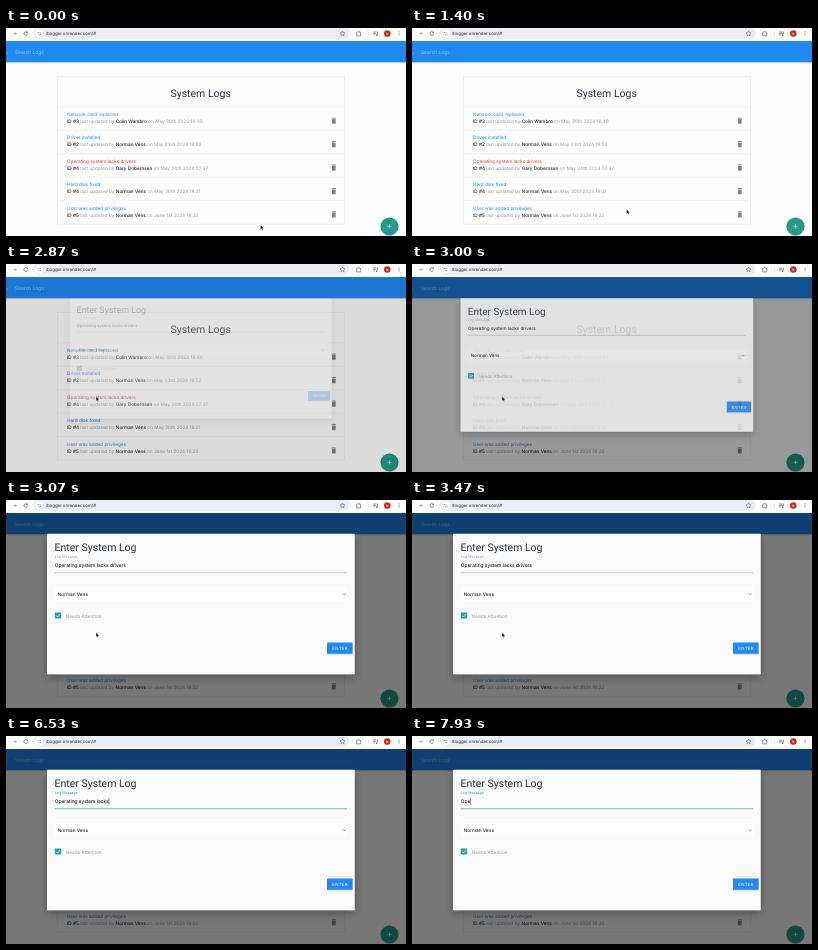
Recreate the animation shown at these times as an HTML page. Size 400 by 208 pixels, loop 8000 ms.

```html
<!DOCTYPE html>
<html lang="en">
<head>
<meta charset="utf-8">
<title>System Logs</title>
<style>
html, body { margin: 0; width: 100%; height: 100%; overflow: hidden; background: #fdfdfd; }
svg { display: block; width: 100vw; height: 100vh; }
text { font: 4.72px Inter, Roboto, sans-serif; white-space: pre; text-rendering: geometricPrecision; }
.head { font: 10.5px Roboto, Inter, sans-serif; fill: #26303f; }
.link { fill: #2089f2; }
.alert { fill: #e0382e; }
.dim { fill: #9e9e9e; }
.icon { fill: none; stroke: #66696e; stroke-width: .7; }
</style>
</head>
<body>
<svg viewBox="0 0 400 208">
  <defs>
    <filter id="shade" x="-20%" y="-20%" width="140%" height="150%">
      <feDropShadow dx="0" dy="3" stdDeviation="4" flood-opacity=".32"/>
    </filter>
    <filter id="soft" x="-30%" y="-30%" width="160%" height="170%">
      <feDropShadow dx="0" dy=".6" stdDeviation=".6" flood-opacity=".22"/>
    </filter>
  </defs>

  <!-- page -->
  <rect width="400" height="208" fill="#fdfdfd"/>
  <rect y="10" width="400" height="24.2" fill="#2089f2" filter="url(#soft)"/>
  <path d="M0 24.6l.9 1" stroke="#fff" stroke-width=".7"/>
  <text x="9" y="25.6" style="font-size:4.86px" fill="#a0cdf9">Search Logs</text>
  <rect x="51.3" y="48.4" width="287.2" height="147.7" fill="#fdfdfd" stroke="#e6e6e6" stroke-width=".5"/>
  <text class="head" x="194.7" y="69.4" text-anchor="middle">System Logs</text>
  <g id="rows"></g>
  <circle cx="383.5" cy="198.4" r="9" fill="#219b8b" filter="url(#soft)"/>
  <path d="M381.5 198.4h4M383.5 196.4v4" stroke="#fff" stroke-width=".7"/>
  <rect id="veil" y="13" width="400" height="195"/>

  <!-- browser bar -->
  <rect width="400" height="13" fill="#fcfcfd"/>
  <rect x="27.5" y="-1" width="316" height="12" rx="6" fill="#e9eef6"/>
  <circle cx="33.3" cy="5.5" r="3.9" fill="#fff"/>
  <g class="icon">
    <path d="M7 5.5h3.2M8.8 4l1.5 1.5L8.8 7" stroke="#a0a3a7"/>
    <path d="M21.3 4.6a1.8 1.8 0 1 0 .2 1.5M21.6 3.5v1.3h-1.3"/>
    <path d="M31.7 4.5h1.6M34.4 4.5h.6M31.7 6.6h.6M33.4 6.6h1.6"/>
    <path d="M336.5 3.1l.7 1.6 1.8.2-1.3 1.2.4 1.8-1.6-.9-1.6.9.4-1.8-1.3-1.2 1.8-.2z" stroke-width=".6"/>
    <path d="M350.7 4.2h1.2a.7.7 0 0 1 1.4 0h1.2v1.2a.7.7 0 0 1 0 1.4v1.1h-3.8z"/>
    <path d="M362.5 3.5v4" stroke="#cdd9ec" stroke-width=".5"/>
    <path d="M367.2 4h3M367.2 5.4h3M367.2 6.8h1.6M371.2 7.2V4h1"/>
  </g>
  <circle cx="370.6" cy="7.2" r=".8" fill="#66696e"/>
  <circle cx="381.3" cy="5.5" r="3.3" fill="#c5301c"/>
  <text x="381.3" y="6.7" text-anchor="middle" style="font-size:3.2px" fill="#fff">N</text>
  <path d="M393 3.9v3.4" stroke="#66696e" stroke-width=".9" stroke-linecap="round" stroke-dasharray="0 1.6"/>
  <text x="40" y="7.1" style="font-size:4.4px" fill="#222">itlogger.onrender.com/#</text>

  <!-- dialog -->
  <g id="modal">
    <rect x="41" y="33.7" width="307.7" height="140.6" rx=".6" fill="#fafafa" filter="url(#shade)"/>
    <text class="head" x="48.6" y="51.1">Enter System Log</text>
    <text id="label" x="48.8" y="57.9" style="font-size:3.6px">Log Message</text>
    <text id="field" x="48.8" y="67.3" style="font-size:4.86px"></text>
    <path id="line" d="M48.7 72.8H341"/>
    <path id="caret" d="M0 62.2v6.4" stroke="#222" stroke-width=".5"/>
    <rect x="48.7" y="87" width="292.3" height="13.6" fill="#fff"/>
    <text x="51.8" y="95.7">Norman Vens</text>
    <path d="M337 93.5l1.3 1.3 1.3-1.3" fill="none" stroke="#333" stroke-width=".6"/>
    <rect x="48.8" y="112.4" width="6.4" height="6.2" rx=".6" fill="#26a69a"/>
    <path d="M50.3 115.6l1.3 1.4 2.4-2.9" fill="none" stroke="#fff" stroke-width=".7"/>
    <text class="dim" x="59.8" y="117.9">Needs Attention</text>
    <rect x="321" y="142.4" width="25.6" height="11.4" rx=".6" fill="#2089f2" filter="url(#soft)"/>
    <text x="334" y="149.8" text-anchor="middle" style="font-size:4.3px;letter-spacing:.3px" fill="#fff">ENTER</text>
  </g>

  <path id="arrow" d="M0 0V4.6L1.1 3.6 1.8 5.2 2.6 4.9 1.9 3.3H3.3Z" fill="#111" stroke="#fff" stroke-width=".3"/>
  <path id="beam" d="M-1-2.3Q0-2.3 0-1.7V1.7Q0 2.3-1 2.3M1-2.3Q0-2.3 0-1.7V1.7Q0 2.3 1 2.3" fill="none" stroke="#333" stroke-width=".35"/>
</svg>
<script>
const $ = id => document.getElementById(id);
const MESSAGE = 'Operating system lacks drivers';
const LOOP = 8000, OPEN = 2805, FOCUS = 4530;

const logs = [
  ['Network card replaced', 3, 'Colin Wambro', 'May 30th 2024 16:49'],
  ['Driver installed', 2, 'Norman Vens', 'May 23rd 2024 18:52'],
  [MESSAGE, 4, 'Gary Dobernsen', 'May 24th 2024 07:37'],
  ['Hard disk fixed', 4, 'Norman Vens', 'May 30th 2024 18:21'],
  ['User was added privileges', 5, 'Norman Vens', 'June 1st 2024 16:22']
];
$('rows').innerHTML = logs.map(([title, id, who, when], i) => `
  <g transform="translate(0 ${78.8 + i * 23.45})">
    <path d="M51.3 0H338.5" stroke="#e6e6e6" stroke-width=".5"/>
    <text class="${title === MESSAGE ? 'alert' : 'link'}" x="61" y="9">${title}</text>
    <text x="61" y="16.2">ID #${id} <tspan class="dim">last updated by</tspan> ${who} <tspan class="dim">on ${when}</tspan></text>
    <path d="M325.6 11.8h4.4v-.8h-1.2l-.4-.4h-1.2l-.4.4h-1.2zM325.9 12.3h3.8v4.1q0 .6-.6.6h-2.6q-.6 0-.6-.6z" fill="#858585"/>
  </g>`).join('');

// Moments at which a character is deleted: one tap, then runs of key repeat
const run = (from, to, n) => Array.from({ length: n }, (_, i) => from + (to - from) * i / (n - 1));
const edits = [5170, ...run(5930, 6270, 6), ...run(6470, 7270, 12), ...run(7400, 7925, 8)];

// Pointer moves: start, end, from, to
const moves = [
  [1000, 2250, [254.5, 197], [90, 132.5]],
  [3700, 4450, [90, 132.5], [129.3, 66.5]]
];

const clamp = x => Math.min(1, Math.max(0, x));
const smooth = x => x * x * (3 - 2 * x);
const show = (id, on) => $(id).style.display = on ? '' : 'none';

function pointer(t) {
  const [start, end, a, b] = moves[t < moves[1][0] ? 0 : 1];
  const k = smooth(clamp((t - start) / (end - start)));
  return a.map((v, i) => v + (b[i] - v) * k);
}

function draw(now) {
  const t = now % LOOP;

  const p = clamp((t - OPEN) / 260), s = .8 + .2 * p;
  $('veil').setAttribute('opacity', .53 * p);
  $('modal').setAttribute('opacity', p);
  $('modal').setAttribute('transform', `translate(195 ${34 + (p < 1 ? 1 - p * p : 0)}) scale(${s}) translate(-195 -34)`);
  show('modal', p > 0);

  const focused = t >= FOCUS;
  $('label').setAttribute('fill', focused ? '#26a69a' : '#9e9e9e');
  $('line').setAttribute('stroke', focused ? '#26a69a' : '#8a8a8a');
  $('line').setAttribute('stroke-width', focused ? .7 : .4);

  const done = edits.filter(e => e <= t);
  $('field').textContent = MESSAGE.slice(0, MESSAGE.length - done.length);
  const since = t - (done.length ? done[done.length - 1] : FOCUS);
  show('caret', focused && since % 1000 < 500);
  if (focused) $('caret').setAttribute('transform', `translate(${49.1 + $('field').getComputedTextLength()} 0)`);

  const [x, y] = pointer(t);
  const overField = p === 1 && y < 74;
  for (const id of ['arrow', 'beam']) $(id).setAttribute('transform', `translate(${x} ${y})`);
  show('arrow', !overField);
  show('beam', overField && !done.length);

  requestAnimationFrame(draw);
}
requestAnimationFrame(draw);
</script>
</body>
</html>
```
